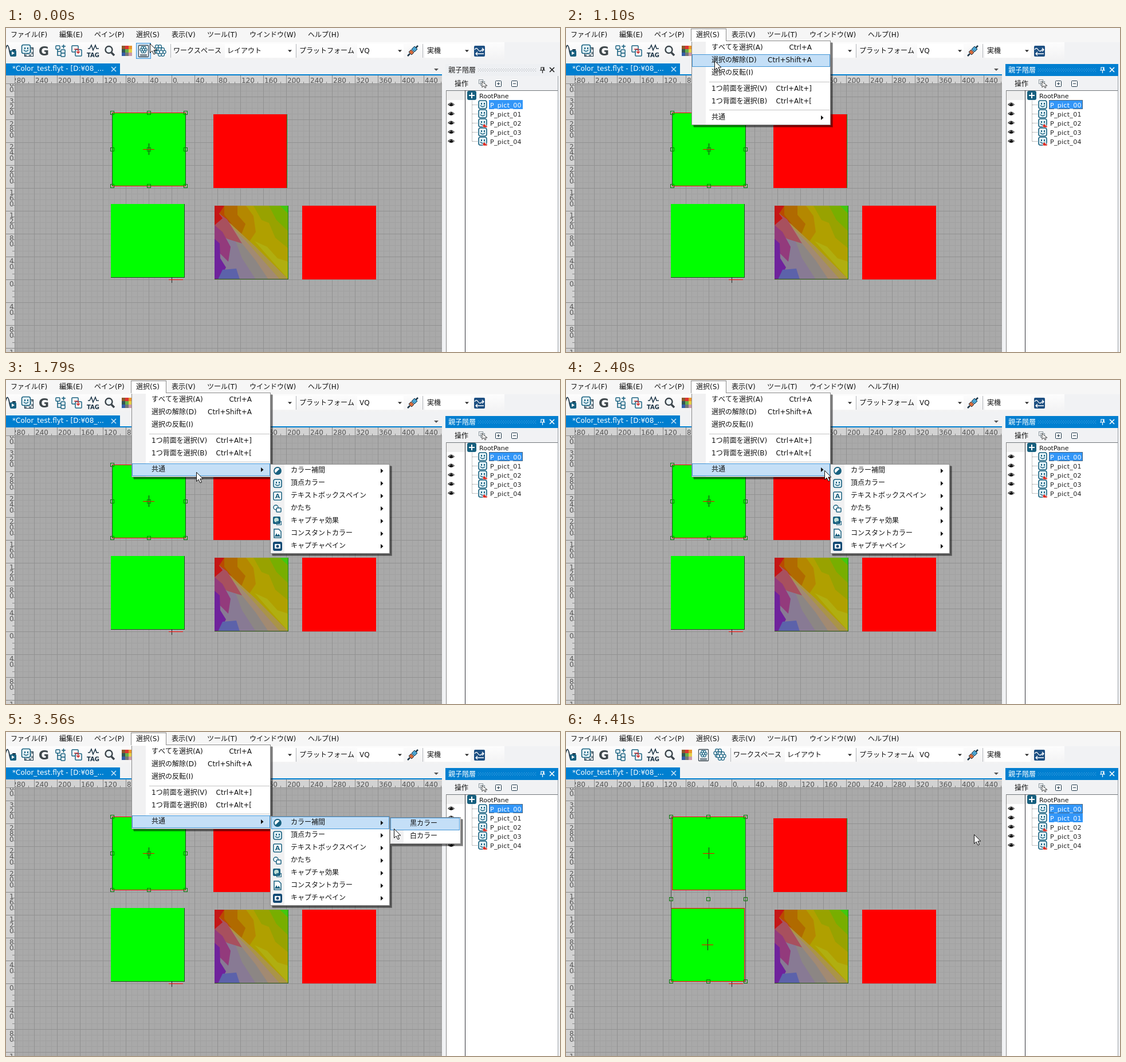
Write an HTML page with a canvas that moves like this. It is 967 px wide and 567 px high and loops after 5.11 s.

```html
<!DOCTYPE html>
<html lang="ja">
<head>
<meta charset="utf-8">
<title>Layout editor</title>
<style>
html, body { margin: 0; width: 100%; height: 100%; overflow: hidden; }
canvas { display: block; }
</style>
</head>
<body>
<canvas id="stage" width="967" height="567"></canvas>
<script>
const c = document.getElementById('stage').getContext('2d');
const LOOP = 5110, TEAL = '#17607f', DARK = '#1b3446', LIME = '#00ff00', RED = '#ff0000';
const FAMILY = '"DejaVu Sans", "Noto Sans CJK JP", sans-serif';

// Helpers
function box(x, y, w, h, fill) { c.fillStyle = fill; c.fillRect(x, y, w, h); }
function frame(x, y, w, h, color) {
  c.strokeStyle = color; c.lineWidth = 1;
  c.strokeRect(x + .5, y + .5, w - 1, h - 1);
}
function text(s, x, y, color = '#111', size = 12, align = 'left', weight = '') {
  c.font = `${weight} ${size}px ${FAMILY}`;
  c.textAlign = align; c.fillStyle = color;
  c.fillText(s, x, y);
}
function shape(x, y, d, fill, stroke, width = 1.5) {
  const p = new Path2D(d);
  c.save(); c.translate(x, y);
  if (fill) { c.fillStyle = fill; c.fill(p); }
  if (stroke) { c.strokeStyle = stroke; c.lineWidth = width; c.stroke(p); }
  c.restore();
}
function round(x, y, w, h, r, fill, stroke, width = 1.5) {
  c.beginPath(); c.roundRect(x, y, w, h, r);
  if (fill) { c.fillStyle = fill; c.fill(); }
  if (stroke) { c.strokeStyle = stroke; c.lineWidth = width; c.stroke(); }
}
function disc(x, y, r, fill, stroke, width = 1.5) { round(x - r, y - r, 2 * r, 2 * r, r, fill, stroke, width); }
function ramp(x0, y0, x1, y1, a, b) {
  const g = c.createLinearGradient(x0, y0, x1, y1);
  g.addColorStop(0, a); g.addColorStop(1, b);
  return g;
}
const downArrow = (x, y) => shape(x, y, 'M-3 -1.5H4L.5 2Z', '#222');
const rightArrow = (x, y) => shape(x, y, 'M-2 -4V4L2.5 0Z', '#111');

// Pointer moves: start, end, number of steps, target
const START = [251, 27];
const MOVES = [
  [80, 160, 2, 244, 14], [320, 320, 1, 244, 16], [1100, 1100, 1, 259, 57],
  [1180, 1400, 4, 321, 162], [1480, 1480, 1, 322, 163], [1640, 1940, 5, 338, 159],
  [2100, 2400, 5, 451, 158], [2475, 2550, 2, 481, 159], [2630, 2700, 2, 490, 159],
  [2860, 2860, 1, 508, 160], [3090, 3560, 7, 677, 169], [3640, 3940, 5, 712, 179]
];
function pointerAt(t) {
  let [x, y] = START;
  for (const [from, to, steps, tx, ty] of MOVES) {
    if (t < from) break;
    const gap = steps > 1 ? (to - from) / (steps - 1) : 1;
    const k = Math.min(steps, Math.floor((t - from) / gap + .01) + 1) / steps;
    x += (tx - x) * k; y += (ty - y) * k;
  }
  return [Math.round(x), Math.round(y)];
}

// Small icons
function face(x, y, r = 7) {
  round(x - r, y - r, 2 * r, 2 * r, 3, '#e4f3f8', TEAL, 1.6);
  box(x - 3, y - 3, 2, 3, TEAL); box(x + 2, y - 3, 2, 3, TEAL);
  shape(x, y, 'M-4 1.5Q0 6 4 1.5', null, TEAL, 1.4);
}
function gear(x, y, r) {
  for (let i = 0; i < 6; i++) {
    const a = i * Math.PI / 3;
    disc(x + r * .65 * Math.cos(a), y + r * .65 * Math.sin(a), r * .36, '#fff', TEAL, 1.2);
  }
  disc(x, y, r * .38, '#fff', TEAL, 1.3);
}
function eye(x, y) {
  shape(x, y, 'M-6 0Q0 -7 6 0Q0 6 -6 0Z', '#111');
  shape(x, y, 'M-4 1Q-3 -1 -2 -2M2 -2Q4 -1 4 1', null, '#fff', 1);
  box(x - 1, y - 2, 1, 1, '#fff');
}

function menuBar(hover) {
  box(0, 0, 967, 84, '#f1f2f4');
  box(0, 0, 967, 25, '#f6f6f6');
  box(0, 25, 870, 31, ramp(0, 25, 0, 56, '#fdfdfd', '#f2f2f3'));
  if (hover) { box(218, 1, 62, 22, '#d3e8f8'); frame(218, 1, 62, 22, '#70b0e0'); }
  const titles = { 8: 'ファイル(F)', 93: '編集(E)', 154: 'ペイン(P)', 227: '選択(S)', 289: '表示(V)',
    351: 'ツール(T)', 425: 'ウインドウ(W)', 527: 'ヘルプ(H)' };
  for (const x in titles) text(titles[x], +x, 16);
}

function toolbar(pressed) {
  shape(8, 40, 'M-9 -2Q-5 -18 -2 0T4 -2L9 -2', null, DARK, 1.8);
  round(7, 39, 11, 11, 2, TEAL); shape(12, 44, 'M-2 -3V3L3 0Z', '#fff');
  for (let i = 0; i < 16; i++) if ((i + (i >> 2)) % 2) box(32 + i % 4 * 4, 34 + (i >> 2) * 4, 4, 4, '#7d8c94');
  frame(32, 34, 16, 16, DARK); face(35, 37, 7.5);
  text('G', 66, 48, '#3f474b', 22, 'center', 'bold');
  [[87, 31], [96, 38], [96, 44]].forEach(([x, y]) => round(x, y, 7, 6, 1, '#fff', TEAL));
  shape(90, 37, 'M0 0V11H6M0 4H6M7 -5H14M10.5 -8V-1', null, TEAL, 1.6);
  round(115, 31, 11, 11, 1, '#fff', TEAL); round(121, 38, 11, 11, 1, '#fff', TEAL);
  shape(121, 37, 'M-2 0H5V7M2 4L5 7L8 4', null, '#c33', 1.6);
  shape(152, 35, 'M-9 1H-6L-3 -5L0 4L4 -5L6 1H10', null, DARK, 1.5);
  text('TAG', 152, 51, DARK, 10, 'center', 'bold');
  disc(179.5, 38, 6, '#eef6fa', '#3c444a', 2.4);
  shape(184, 43, 'M0 0L5 5', null, '#3c444a', 3.5);
  ['#8c5a2b', '#d33', '#e8962e', '#355', '#63b04a', '#e6cf49', '#345fa8', '#777', '#c9a']
    .forEach((color, i) => box(202 + i % 3 * 6, 31 + (i / 3 | 0) * 6, 6, 6, color));
  if (pressed) { box(227, 26, 26, 28, '#c9e2f7'); frame(227, 26, 26, 28, '#3c96dc'); }
  round(231.5, 30.5, 17, 20, 1, '#fff', '#3a4750', 1.3);
  gear(240, 38, 6); box(234, 46, 12, 1, DARK); box(234, 48, 12, 1, DARK);
  gear(266, 37, 8); gear(271, 42, 8);
  [287, 506, 727].forEach(x => box(x, 28, 1, 24, '#b5b8bc'));
  [[382, 123], [613, 81], [731, 80]].forEach(([x, w]) => box(x, 28, w, 24, '#fff'));
  text('ワークスペース', 292, 44); text('レイアウト', 386, 44);
  text('プラットフォーム', 512, 44); text('VQ', 617, 44); text('実機', 735, 44);
  [495, 687, 804].forEach(x => downArrow(x, 40));
  shape(710, 40, 'M-9 9L-5 5M5 -5L9 -9', null, DARK, 2.5);
  shape(710, 40, 'M-7 2L-2 7L2 3L-3 -2Z', '#d96b3a', DARK, 1);
  shape(710, 40, 'M-2 -3L3 -8L8 -3L3 2Z', '#4aa3d0', DARK, 1);
  round(817, 31, 19, 19, 2, '#1d4f82');
  shape(826, 40, 'M-8 -2Q-5 -7 -2 -2T5 -2H8M5 -5L8 -2L5 1M8 5H-6M-3 2L-6 5L-3 8', null, '#fff', 1.3);
}

function rulersAndGrid() {
  box(0, 62, 199, 20, '#007fd0'); box(0, 81, 761, 2, '#007fd0');
  text('*Color_test.flyt - [D:¥08_...', 11, 75, '#fff');
  shape(188, 72, 'M-4 -4L4 4M4 -4L-4 4', null, '#d8ecfa', 1.4);
  shape(751, 73, 'M-4 -2H4L0 2Z', '#555');
  box(0, 83, 761, 484, '#d2d2d2');
  box(15, 98, 746, 469, '#a9a9a9');
  for (const [gap, color] of [[10, '#a1a1a1'], [40, '#919191']]) {
    for (let x = 289 - Math.floor(273 / gap) * gap; x < 761; x += gap) box(x, 98, 1, 469, color);
    for (let y = 440 - Math.floor(341 / gap) * gap; y < 567; y += gap) box(15, y, 746, 1, color);
  }
  c.save();
  c.beginPath(); c.rect(15, 83, 746, 15); c.clip();
  for (let x = 9; x < 761; x += 10) {
    const major = (x - 9) % 40 === 0;
    box(x, major ? 83 : 94, 1, major ? 15 : 4, '#858585');
    if (major) text(Math.abs(x - 289), x + 2, 96, '#555');
  }
  c.restore(); c.save();
  c.beginPath(); c.rect(0, 98, 15, 469); c.clip();
  for (let y = 80; y < 570; y += 10) {
    const major = y % 40 === 0;
    box(major ? 0 : 11, y, major ? 15 : 4, 1, '#858585');
    if (major) [...String(Math.abs(y - 440))].forEach((d, i) => text(d, 6, y + 12 + i * 10, '#555'));
  }
  c.restore();
  box(0, 97, 761, 1, '#8c8c8c'); box(15, 83, 1, 484, '#8c8c8c');
}

// Banded four-corner blend, painted back to front
const BANDS = [
  ['#b0a000', 'M0 0H129V129H0Z'],
  ['#b48800', 'M0 0H55L68 18L72 46L60 64L15 20Z'],
  ['#b06a00', 'M0 0H40V16L54 32L46 52L22 30Z'],
  ['#ba4a00', 'M0 0H17V16L30 32L18 28Z'],
  ['#98a200', 'M68 0H129V75L106 56L95 30L82 25Z'],
  ['#78ae00', 'M95 0H129V45L108 25Z'],
  ['#40c810', 'M114 0H129V14Z'],
  ['#b0ae10', 'M70 62L92 72L110 92L129 98V129Z'],
  ['#aa9448', 'M0 6L22 26L72 72L129 129H0Z'],
  ['#a28a72', 'M0 8L55 62L114 129H0Z'],
  ['#8c8684', 'M0 12L48 66L72 96L94 129H0Z'],
  ['#887a94', 'M0 16L36 60L48 92L72 129H0Z'],
  ['#a8505e', 'M0 8L22 24L48 66L22 58L0 42Z'],
  ['#933a7c', 'M0 34L14 46L28 72L24 98L0 74Z'],
  ['#6f229c', 'M0 58L9 66L10 92L20 108L8 129H0Z'],
  ['#5c62aa', 'M6 129L14 112L38 110L44 129Z'],
  ['#c41616', 'M0 0H17L8 14L14 22L0 34Z']
];

const cross = (x, y) => { box(x, y - 10, 1, 20, '#222'); box(x - 10, y, 20, 1, RED); };
const handle = (x, y) => frame(x - 3, y - 3, 7, 7, '#087a08');

function scene(both) {
  box(185, 149, 129, 128, LIME); box(183, 308, 129, 129, LIME);
  box(311, 308, 1, 129, '#155015'); box(183, 436, 129, 1, '#155015');
  box(362, 151, 129, 129, RED); box(490, 151, 1, 129, '#18801a');
  BANDS.forEach(([color, d]) => shape(364, 311, d, color));
  box(492, 311, 1, 129, '#18801a'); box(364, 439, 129, 1, '#345c18');
  box(517, 311, 129, 129, RED);
  box(289, 436, 1, 10, '#222'); box(284, 440, 25, 1, RED);
  frame(185, 148, 129, 129, both ? RED : '#155015');
  cross(249, 212);
  if (both) {
    frame(183, 308, 129, 129, RED);
    cross(247, 372);
    frame(183, 148, 131, 289, '#4a4a4a');
    box(185, 148, 129, 1, RED); box(183, 436, 129, 1, RED);
  } else {
    box(185, 148, 129, 1, RED); box(185, 276, 129, 1, RED);
  }
  const [xs, ys] = both ? [[183, 248, 313], [148, 292, 436]] : [[185, 249, 313], [148, 212, 276]];
  xs.forEach(x => ys.forEach(y => handle(x, y)));
}

function treePanel(active, both) {
  box(761, 57, 206, 510, '#f1f2f4');
  box(767, 63, 197, 21, active ? '#007fd0' : '#eef0f3');
  const ink = active ? '#fff' : '#222';
  text('親子階層', 772, 78, ink);
  for (let y = 0; y < 3; y++)
    for (let x = 824 + y % 2 * 2; x < 926; x += 4) box(x, 71 + y * 2, 1, 1, active ? '#59b2e8' : '#a4a8ae');
  shape(936, 73, 'M-2 -4H3V1H-2ZM-4 1H5M.5 1V6M2 -4V1', null, ink, 1.2);
  shape(953, 73, 'M-4 -4L4 4M4 -4L-4 4', null, ink, 1.7);
  text('操作', 783, 102);
  frame(825, 90, 8, 8, '#89959c'); frame(828, 93, 8, 8, '#89959c');
  shape(831, 94, 'M0 0V10L3 7L5 11L7 10L5 7H9Z', '#fff', '#444', 1);
  for (const x of [854, 882]) {
    round(x + .5, 92.5, 10, 10, 1, '#fff', DARK, 1);
    box(x + 3, 97, 5, 1, DARK);
  }
  box(856 + 3, 95, 1, 5, DARK);
  box(768, 109, 196, 458, '#fff');
  box(769, 110, 32, 16, '#efefef');
  box(768, 109, 196, 1, '#70757a'); box(801, 109, 1, 458, '#30343a');
  box(768, 109, 1, 458, '#888'); box(963, 84, 1, 483, '#9a9fa5');
  for (let y = 127; y < 199; y += 2) box(813, y, 1, 1, '#888');
  round(805, 110, 16, 16, 3, TEAL);
  box(808, 117, 10, 2, '#fff'); box(812, 113, 2, 10, '#fff');
  text('RootPane', 826, 123, '#111', 11);
  for (let i = 0; i < 5; i++) {
    const y = 134 + i * 16, picked = i === 0 || both && i === 1;
    for (let x = 814; x < 823; x += 2) box(x, y, 1, 1, '#888');
    eye(777, y);
    face(832, y);
    if (i % 2 === 0 && i) shape(835, y + 4, 'M-3 1Q0 -4 2 0T5 -1V4H-2Z', '#dc2a20', '#fff', .6);
    if (picked) box(843, y - 8, 59, 16, '#3296f8');
    if (active && i === 0) {
      c.setLineDash([1, 1]); frame(843, y - 8, 59, 16, '#5a3000'); c.setLineDash([]);
    }
    c.letterSpacing = '.3px';
    text('P_pict_0' + i, 845, y + 5, picked ? '#fff' : '#222', 11);
    c.letterSpacing = '0px';
  }
}

function menu(x, y, w, h, gutter) {
  box(x + 4, y + 4, w, h, 'rgba(0,0,0,.3)'); box(x + 3, y + 3, w, h, 'rgba(0,0,0,.3)');
  box(x, y, w, h, '#fff'); box(x + 1, y + 1, gutter, h - 2, '#f1f1f2');
  frame(x, y, w, h, '#8b8b8b');
}
function highlight(x, y, w) { box(x, y, w, 22, '#c4dff7'); frame(x, y, w, 22, '#4295d6'); }

const MAIN = [
  [33, 'すべてを選択(A)', 'Ctrl+A'], [55, '選択の解除(D)', 'Ctrl+Shift+A'], [77, '選択の反転(I)', ''],
  [105, '1つ前面を選択(V)', 'Ctrl+Alt+]'], [127, '1つ背面を選択(B)', 'Ctrl+Alt+['], [155, '共通', '']
];
function mainMenu(t, py) {
  menu(219, 22, 243, 148, 24);
  box(218, 1, 62, 23, '#fff'); box(218, 1, 62, 1, '#8b8b8b');
  box(218, 1, 1, 22, '#8b8b8b'); box(279, 1, 1, 22, '#8b8b8b');
  text('選択(S)', 227, 16);
  box(250, 94, 210, 1, '#c4c4c4'); box(250, 143, 210, 1, '#c4c4c4');
  for (const [y, label, keys] of MAIN) {
    const hot = t >= 1640 ? y === 155 : py >= y - 10 && py < y + 12;
    if (hot && t < 4330) highlight(220, y - 9, 241);
    text(label, 254, y + 5); text(keys, 429, y + 5, '#111', 12, 'right');
  }
  rightArrow(447, 157);
}

const COMMON = ['カラー補間', '頂点カラー', 'テキストボックスペイン', 'かたち', 'キャプチャ効果', 'コンスタントカラー', 'キャプチャペイン'];
function commonMenu(t) {
  menu(461, 147, 209, 157, 24);
  if (t >= 2475 && t < 4330) highlight(463, 148, 206);
  COMMON.forEach((label, i) => {
    text(label, 497, 162 + i * 22);
    rightArrow(656, 159 + i * 22);
  });
  disc(474, 159, 6, '#fff', TEAL, 1.8); shape(474, 159, 'M4.5 -4.5A6.4 6.4 0 0 1 -4.5 4.5Z', TEAL);
  face(474, 181);
  round(467, 196, 14, 14, 2, '#fff', TEAL); text('A', 474, 207, TEAL, 11, 'center', 'bold');
  disc(471, 223, 4, '#fff', TEAL); round(472, 224, 8, 7, 1, '#fff', TEAL);
  round(466, 239, 13, 13, 2, TEAL); disc(472, 245, 4, '#bfe0d8'); frame(472, 247, 9, 7, TEAL);
  shape(468, 261, 'M0 0H8L12 4V15H0Z', '#fff', TEAL); shape(468, 272, 'M1 2L4 -4L6 0L8 -3L11 2Z', TEAL);
  round(466, 283, 16, 16, 3, '#124a74'); round(469, 287, 10, 8, 1, '#fff'); disc(474, 291, 2.5, '#124a74');
}
function colorMenu(t) {
  menu(670, 149, 124, 47, 23);
  if (t >= 3560) highlight(671, t < 3715 ? 150 : 172, 121);
  text('黒カラー', 705, 164); text('白カラー', 705, 186);
}

function draw(now) {
  const t = now % LOOP, [px, py] = pointerAt(t);
  const open = t >= 480 && t < 4410, both = t >= 4410;
  menuBar(t >= 160 && t < 480);
  toolbar(t < 80);
  rulersAndGrid();
  scene(both);
  treePanel(t >= 480, both);
  if (open) mainMenu(t, py);
  if (open && t >= 1790) commonMenu(t);
  if (open && t >= 2860) colorMenu(t);
  shape(px + .5, py + .5, 'M0 0V16L3.5 12.5L6.5 18.5L9 17.5L6.3 11.5H11.3Z', '#fff', '#111', 1);
  requestAnimationFrame(draw);
}
requestAnimationFrame(draw);
</script>
</body>
</html>
```
